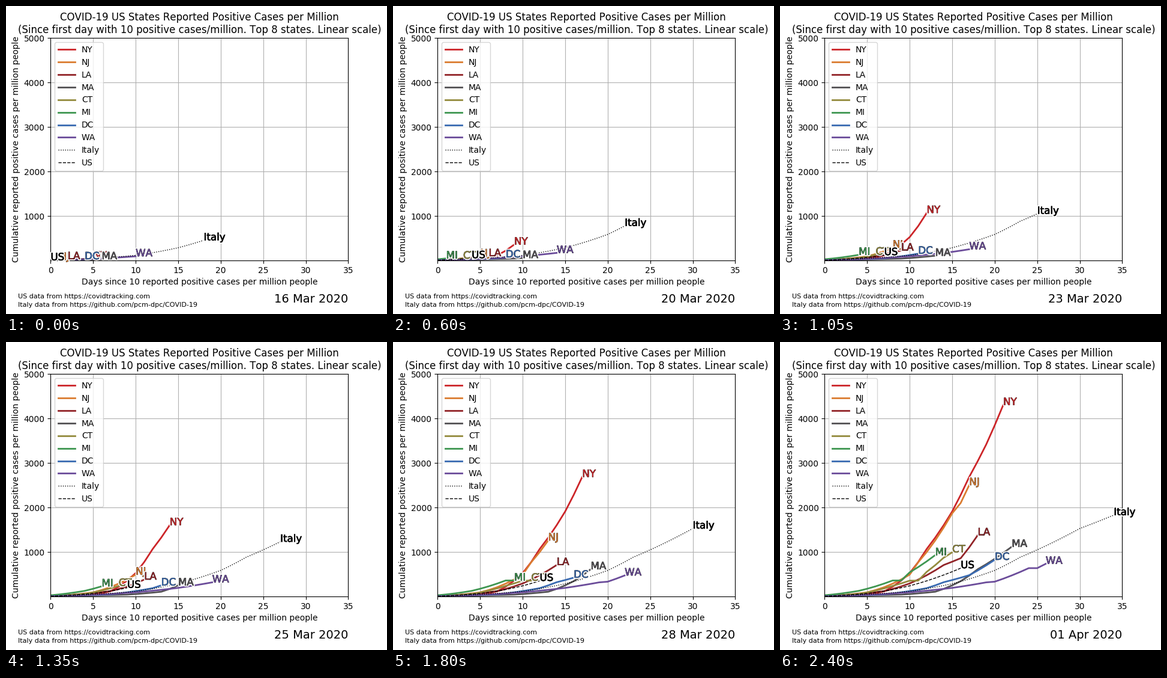
Recreate the animation shown at these times as a matplotlib script. Size 635 by 512 pixels, loop 4.95 s.

```python
import matplotlib.pyplot as plt
import matplotlib.patheffects as pe
import numpy as np
from matplotlib.animation import FuncAnimation

W, H, DPI = 635, 512, 100
STEP_MS = 150
DAYS = 17            # 16 March to 1 April
HOLD = 16            # extra steps on the last day

plt.rcParams["font.family"] = "DejaVu Sans"
plt.rcParams["text.kerning_factor"] = 6

fig = plt.figure(figsize=(W / DPI, H / DPI), dpi=DPI, facecolor="white")
ax = fig.add_axes([74.43 / W, 89.19 / H, 496 / W, 369.6 / H])
ax.set_xlim(0, 35)
ax.set_ylim(10, 5000)
ax.grid(True)
ax.set_title("COVID-19 US States Reported Positive Cases per Million\n"
             "(Since first day with 10 positive cases/million. "
             "Top 8 states. Linear scale)")
ax.set_xlabel("Days since 10 reported positive cases per million people")
ax.set_ylabel("Cumulative reported positive cases per million people")

HALO = [pe.Stroke(linewidth=3, foreground="white"),
        pe.Stroke(linewidth=0.5, foreground="black"),
        pe.Normal()]
tracks = []


def growth(keys):
    """Daily values through (day, cases) keys, growing quadratically between."""
    days, cases = zip(*keys)
    return np.interp(np.arange(days[-1] + 1), days, np.sqrt(cases)) ** 2


def add_track(name, color, *keys, style="-", width=2):
    line, = ax.plot([], [], color=color, ls=style, lw=width, label=name)
    tag = ax.text(0, 0, name, color=color, fontsize=12, path_effects=HALO)
    tracks.append((line, tag, growth(keys)))


add_track("NY", "#cc2529", (0, 11), (5, 49), (7, 122), (10, 532), (12, 1073),
          (15, 1916), (17, 2690), (19, 3419), (21, 4304))
add_track("NJ", "#da7c30", (0, 11), (5, 100), (7, 215), (10, 496), (11, 774),
          (15, 1873), (16, 2105), (17, 2506))
add_track("LA", "#922428", (0, 16), (7, 126), (10, 299), (14, 713), (16, 866),
          (18, 1382))
add_track("MA", "#535154", (0, 13), (9, 48), (13, 113), (16, 351), (18, 618),
          (22, 1123))
add_track("CT", "#948b3d", (0, 19), (4, 63), (8, 245), (10, 362), (11, 362),
          (12, 559), (14, 877), (15, 998))
add_track("MI", "#3e9651", (0, 34), (4, 133), (8, 366), (9, 366), (10, 549),
          (13, 935))
add_track("DC", "#396ab1", (0, 14), (7, 55), (12, 194), (14, 327), (17, 485),
          (20, 830))
add_track("WA", "#6b4c9a", (0, 10), (10, 101), (15, 200), (19, 324), (20, 339),
          (24, 643), (25, 643), (26, 740))
add_track("Italy", "black", (0, 11), (10, 122), (15, 293), (20, 592),
          (23, 888), (30, 1532), (34, 1832), style=":", width=1)
add_track("US", "black", (0, 12), (6, 97), (10, 246), (16, 642),
          style="--", width=1)
ax.legend(loc="upper left")


def note(x, y, text, size, align="left"):
    return ax.text(x, y, text, fontsize=size, ha=align, transform=ax.transAxes)


note(-0.11, -0.17, "US data from https://covidtracking.com", 8)
note(-0.11, -0.21, "Italy data from https://github.com/pcm-dpc/COVID-19", 8)
date = note(1, -0.19, "", 14, "right")


def update(step):
    day = min(step, DAYS - 1)
    for line, tag, values in tracks:
        last = len(values) - DAYS + day
        shown = values[:max(last + 1, 0)]
        line.set_data(np.arange(len(shown)), shown)
        tag.set_visible(last >= 0)
        if last >= 0:
            tag.set_position((last, shown[-1]))
    date.set_text(f"{16 + day} Mar 2020" if day < 16 else "01 Apr 2020")
    return []


anim = FuncAnimation(fig, update, frames=DAYS + HOLD, interval=STEP_MS,
                     repeat=True, repeat_delay=0, blit=False)
plt.show()
```
